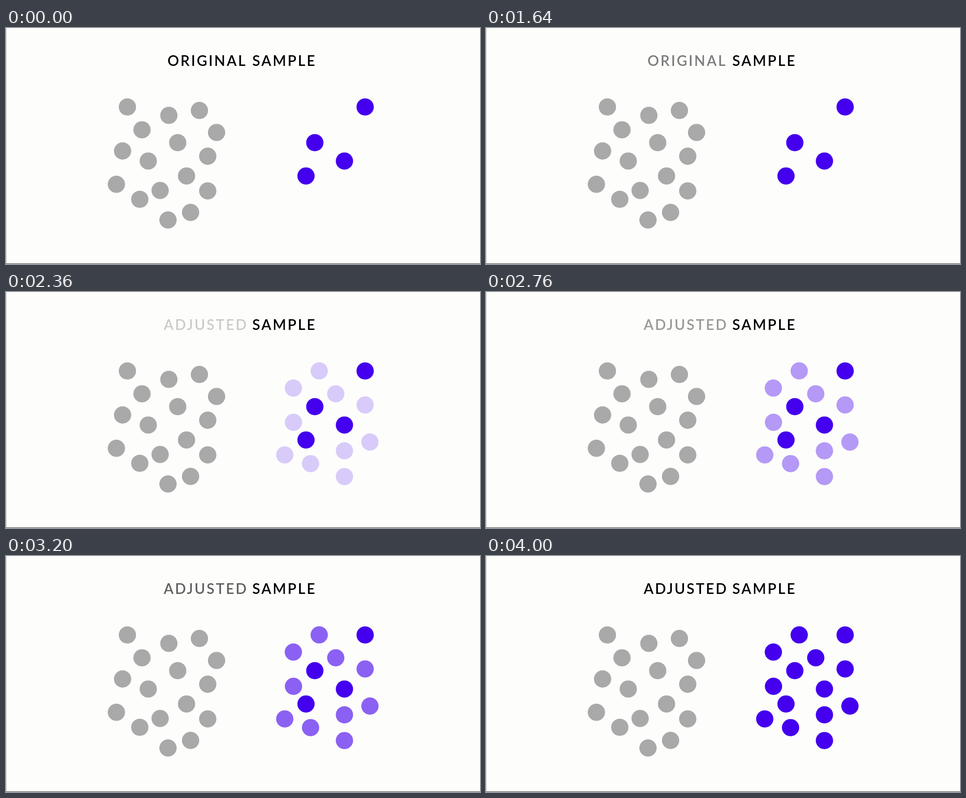
An HTML page for the animation above (5 s loop, 1058 by 529 pixels).

```html
<!DOCTYPE html>
<html lang="en">
<head>
<meta charset="utf-8">
<title>Sample adjustment</title>
<style>
  html, body { margin: 0; width: 100%; height: 100%; overflow: hidden; background: #fdfdfc; }
  svg { display: block; width: 1058px; height: 529px; }
  text { font: 600 32px Lato, "Open Sans", sans-serif; letter-spacing: 3.3px; fill: #000; }
  .population { fill: #a9a9a9; }
  .sample { fill: #4400ee; }
  .before { animation: leave 5s linear infinite; }
  .after { animation: enter 5s linear infinite; }
  @keyframes leave {
    0%, 26.4% { opacity: 1; }
    39.4%, 100% { opacity: 0; }
  }
  @keyframes enter {
    0%, 39.4% { opacity: 0; }
    79.6%, 100% { opacity: 1; }
  }
</style>
</head>
<body>
<svg viewBox="0 0 1058 529">
  <rect width="1" height="529" fill="#b8b8b8"/>
  <rect y="528" width="1058" height="1" fill="#222"/>
  <text class="before" x="360.5" y="85">ORIGINAL</text>
  <text class="after" x="352" y="85">ADJUSTED</text>
  <text x="549.7" y="85">SAMPLE</text>
  <g id="population" class="population"></g>
  <g id="kept" class="sample"></g>
  <g id="added" class="sample after"></g>
</svg>
<script>
  const groups = {
    population: [
      [271, 177], [363.5, 195.8], [431.7, 184.8], [303.5, 228.2],
      [470, 234.2], [383.3, 257], [260.2, 275.6], [450.3, 287.4],
      [317.5, 298.2], [403, 331.7], [246.4, 350.3], [344, 364.2],
      [450.3, 365.2], [298.6, 384], [412, 413.4], [361.6, 430.3]
    ],
    kept: [[801.6, 177], [689.3, 257], [755.4, 298.2], [669.6, 331.7]],
    added: [
      [699.1, 176.8], [641.4, 215.3], [736, 228.2], [801.6, 253.2],
      [641.7, 292.1], [812.3, 336.4], [755.4, 356], [622.2, 365.2],
      [679.8, 384.7], [755.4, 413.7]
    ]
  };

  for (const [id, dots] of Object.entries(groups)) {
    document.getElementById(id).innerHTML =
      dots.map(([x, y]) => `<circle cx="${x}" cy="${y}" r="19.3"/>`).join("");
  }
</script>
</body>
</html>
```
